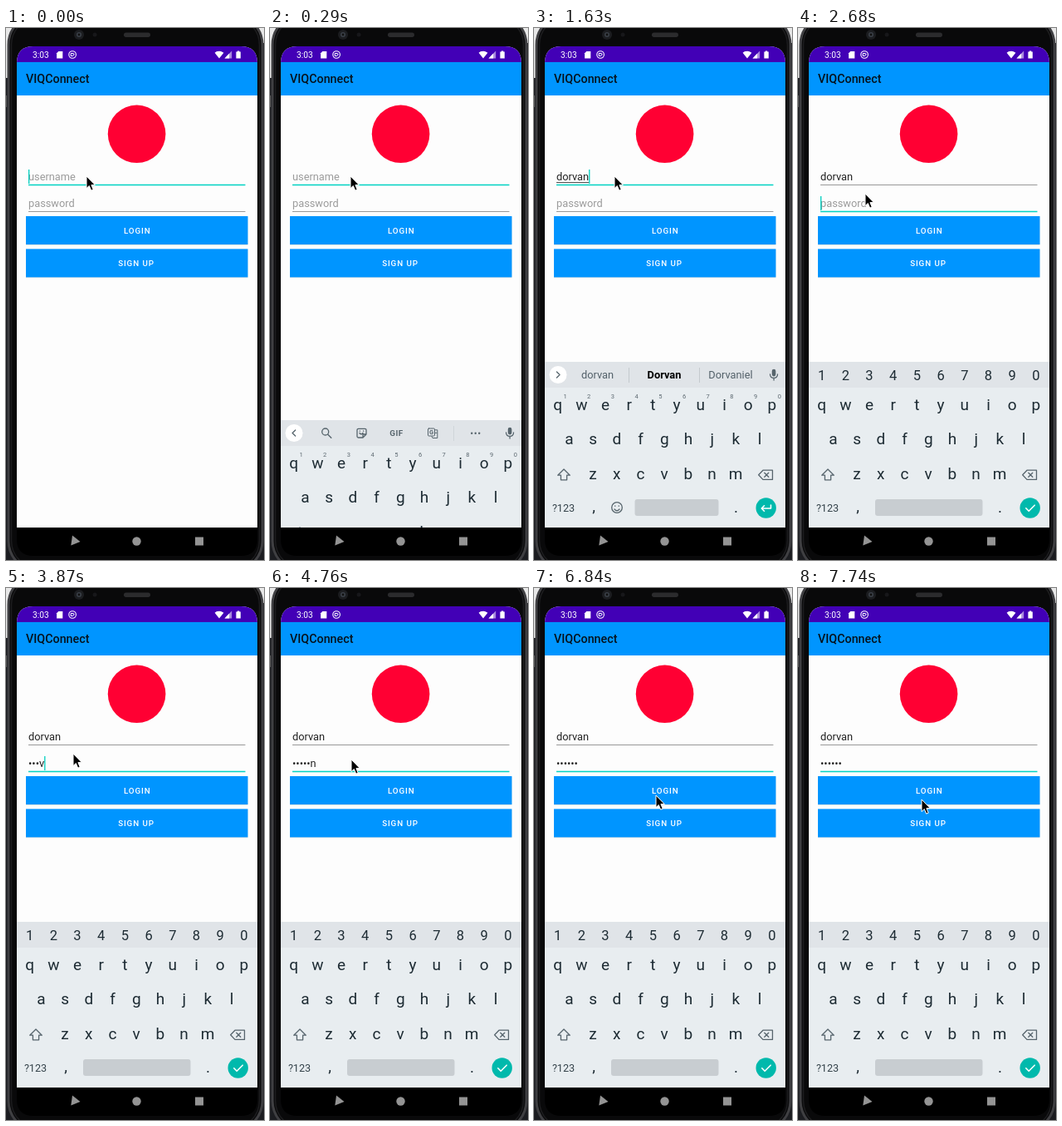
An HTML page that plays this animation: 311 px wide and 639 px high, repeating every 8000 ms.

```html
<!DOCTYPE html>
<html lang="en">
<head>
<meta charset="utf-8">
<title>Login screen</title>
<style>
html, body { margin: 0; width: 100%; height: 100%; overflow: hidden; background: #1c1d21; }
svg { display: block; width: 100vw; height: 100vh; font-family: Roboto, sans-serif; }
.mid { text-anchor: middle; }
.field { font-size: 12.8px; fill: #222; }
.hint { fill: #9b9b9b; }
.btn { font-size: 9.8px; font-weight: 500; letter-spacing: .9px; fill: #fff; }
.key { font-size: 19px; fill: #1d2b33; }
.num { font-size: 16.5px; fill: #1d2b33; }
.sup { font-size: 7.5px; fill: #5c6870; }
.sug { font-size: 12.8px; fill: #53616a; }
.line { fill: none; stroke: #56646c; stroke-width: 1.3; stroke-linejoin: round; stroke-linecap: round; }
.white { stroke: #fff; stroke-width: 1.6; }
.focus { stroke: #03d3c3; stroke-width: 1.3; }
.idle { stroke: #8e8e8e; stroke-width: .9; }

.cursor, .board, .tools, .words, .first, .second, .ripple, .lift {
  animation: 8s step-end infinite;
}
.cursor { animation-name: move; }
.board { animation-name: rise; }
.tools { animation-name: tools; }
.words { animation-name: words; }
.first { animation-name: first; }
.second { animation-name: second; }
.ripple { animation-name: ripple; transform-origin: 149px 254px; }
.lift { animation-name: lift; }

@keyframes move {
  0% { transform: translate(97px, 178px); }
  26% { transform: translate(94px, 183px); }
  27.875% { transform: translate(86px, 193px); }
  29.75% { transform: translate(81px, 199px); }
  57.625% { transform: translate(88px, 202px); }
  59.5% { transform: translate(98px, 206px); }
  61.25% { transform: translate(115px, 217px); }
  63.125% { transform: translate(131px, 229px); }
  65% { transform: translate(141px, 235px); }
  83.625% { transform: translate(143px, 241px); }
  85.5% { transform: translate(147px, 249px); }
  87.375%, 100% { transform: translate(149px, 254px); }
}
@keyframes rise {
  0% { transform: translateY(200px); }
  3.625% { transform: translateY(70px); }
  5.5%, 100% { transform: none; }
}
@keyframes tools { 0% { opacity: 1; } 9.25%, 100% { opacity: 0; } }
@keyframes words { 0% { opacity: 0; } 9.25% { opacity: 1; } 33.5%, 100% { opacity: 0; } }
@keyframes first { 0% { opacity: 1; } 33.5%, 100% { opacity: 0; } }
@keyframes second { 0% { opacity: 0; } 33.5%, 100% { opacity: 1; } }
@keyframes ripple {
  0% { opacity: 0; transform: scale(.4); }
  91.125% { opacity: .24; transform: scale(.4); }
  93% { opacity: .24; transform: scale(1); }
  96.75%, 100% { opacity: 0; transform: scale(1); }
}
@keyframes lift { 0% { opacity: 0; } 91.125% { opacity: .25; } 96.75%, 100% { opacity: 0; } }
</style>
</head>
<body>
<svg viewBox="0 0 311 639" preserveAspectRatio="none">
  <defs>
    <clipPath id="screen"><path d="M13 600V42Q13 22 33 22H283Q303 22 303 42V600Z"/></clipPath>
    <clipPath id="login"><rect x="24" y="226" width="267.5" height="34"/></clipPath>
  </defs>

  <!-- phone body -->
  <path d="M0 0H14V60H0ZM300 0H311V18H300Z" fill="#e8e8e8"/>
  <rect x="3" y="-16" width="306" height="668" rx="36" fill="#09090a" stroke="#3f3f42" stroke-width="3"/>
  <rect x="6.5" y="-12.5" width="299" height="661" rx="32.5" fill="none" stroke="#1d1d1f" stroke-width="1.5"/>
  <path d="M.5 81V95" stroke="#555"/>
  <circle cx="88" cy="8" r="6" fill="#1c1d20"/>
  <circle cx="88" cy="8" r="3" fill="#3a3f47"/>
  <circle cx="88" cy="8" r="1.4" fill="#111"/>
  <circle cx="107" cy="8" r="2.5" fill="#17171a"/>
  <rect x="142" y="5.5" width="32" height="5.5" rx="2.7" fill="#2b2b2d"/>
  <path d="M13 600H303V614Q303 634 283 634H33Q13 634 13 614Z" fill="#000"/>
  <g fill="#949494">
    <path d="M80 609.5L89.5 617L78.3 621.5Z"/>
    <circle cx="157.5" cy="616.5" r="5.2"/>
    <rect x="228" y="611.5" width="10" height="10"/>
  </g>

  <g clip-path="url(#screen)">
    <rect x="13" y="22" width="290" height="578" fill="#fdfdfd"/>
    <rect x="13" y="22" width="290" height="19.5" fill="#4200b6"/>
    <rect x="13" y="41" width="290" height="40" fill="#0095ff"/>

    <!-- status bar -->
    <g fill="#fff">
      <text x="32" y="36" font-size="10.2">3:03</text>
      <path d="M63.3 28H68.3V36.5H61.1V30.3Z"/>
      <path d="M257 36.5L251.6 29.7Q257 25.8 262.4 29.7Z"/>
      <path d="M272.2 27.5V36.5H263.5Z" opacity=".55"/>
      <path d="M269.2 30.6V36.5H263.5Z"/>
      <path d="M277.4 28.6H278.9V27.5H281.3V28.6H282.8V36.5H277.4Z"/>
    </g>
    <circle cx="80.1" cy="32" r="4.3" fill="none" stroke="#fff" stroke-width="1.1"/>
    <path d="M78.2 33.5V30.5H81.4L82.2 32L80.4 33.5Z" fill="none" stroke="#fff"/>

    <text x="24" y="66.2" font-size="14.3" font-weight="500" fill="#06121c">VIQConnect</text>
    <circle cx="157.6" cy="127.3" r="34.8" fill="#ff0033"/>

    <!-- fields -->
    <text id="user" class="field" x="27" y="183"></text>
    <path id="under" stroke="#333" stroke-width=".9"/>
    <text id="pass" class="field" x="27" y="215"></text>
    <g class="first">
      <path class="focus" d="M27 188.5H288.5"/>
      <path class="idle" d="M27 220.5H288.5"/>
    </g>
    <g class="second">
      <path class="idle" d="M27 188.5H288.5"/>
      <path class="focus" d="M27 220.5H288.5"/>
    </g>
    <rect id="caret" width="1.3" height="17" fill="#03cfc0"/>

    <!-- buttons -->
    <rect class="lift" x="24" y="228" width="267.5" height="35" rx="1"/>
    <g opacity=".1">
      <rect x="24" y="227" width="267.5" height="34"/>
      <rect x="24" y="266.2" width="267.5" height="34"/>
    </g>
    <g fill="#0095ff">
      <rect x="24" y="226" width="267.5" height="34"/>
      <rect x="24" y="265.4" width="267.5" height="34"/>
    </g>
    <g clip-path="url(#login)"><circle class="ripple" cx="149" cy="254" r="150" fill="#fff"/></g>
    <text class="btn mid" x="158.3" y="247">LOGIN</text>
    <text class="btn mid" x="157" y="286.3">SIGN UP</text>

    <!-- keyboard -->
    <g class="board">
      <rect x="13" y="401" width="290" height="199" fill="#e8edf0"/>
      <rect x="13" y="401" width="290" height="31" fill="#e0e4e8"/>
      <g id="keys"></g>
      <path class="line" d="M36 530L43.3 537.2H39.6V542.8H32.4V537.2H28.7Z"/>
      <path class="line" d="M276 531.2H287.5V542.4H276L270.7 536.8ZM277.8 534.3L282.8 539.3M282.8 534.3L277.8 539.3"/>
      <text class="mid" x="35.5" y="581" font-size="12.6" fill="#34424a">?123</text>
      <text class="key mid" x="72" y="581">,</text>
      <text class="key mid" x="243.5" y="582">.</text>
      <circle cx="279.7" cy="576.5" r="12.2" fill="#00b9ac"/>

      <g class="first">
        <g id="sups"></g>
        <circle class="line" cx="100" cy="576" r="6.3"/>
        <path class="line" d="M97 578Q100 581.5 103 578M97.8 574V574.3M102.2 574V574.3"/>
        <rect x="121.5" y="566" width="101" height="20" rx="3" fill="#c8cdd1"/>
        <path class="line white" d="M285.5 573V577H274.5M277.5 573.8L274.3 577L277.5 580.2"/>
        <circle cx="29" cy="416.5" r="10.5" fill="#fff"/>
        <rect x="286.8" y="409.8" width="4.6" height="8.6" rx="2.3" fill="#56646c"/>
        <path class="line" d="M284.6 416Q284.8 420.4 289.1 420.4T293.6 416M289.1 420.5V423"/>
        <g class="tools">
          <path class="line" d="M30.6 413L27 416.5L30.6 420"/>
          <circle class="line" cx="66.7" cy="415" r="4"/>
          <path class="line" d="M69.8 418.2L73.8 422.2"/>
          <path class="line" d="M106.5 411.3H114.5Q116 411.3 116 412.8V418L112 422H106.5Q105 422 105 420.5V412.8Q105 411.3 106.5 411.3ZM112 422V418H116M108 416.5Q110 419.3 112 416.5M108.3 414V414.2M112.6 414V414.2"/>
          <text class="mid" x="152.5" y="420" font-size="9.8" font-weight="700" letter-spacing=".5" fill="#56646c">GIF</text>
          <g stroke-width="1">
            <rect class="line" x="190.5" y="411" width="8" height="9" rx="1" style="stroke-width:1"/>
            <path class="line" d="M199.5 412.8H201.8V422.5H196L195 420.6M198.6 416.3H201" style="stroke-width:1"/>
          </g>
          <text class="mid" x="194.5" y="418.2" font-size="7.5" font-weight="700" fill="#56646c">G</text>
          <path d="M221.5 408V426" stroke="#d0d5d9"/>
          <g fill="#56646c">
            <circle cx="243.2" cy="416.8" r="1.2"/><circle cx="247.7" cy="416.8" r="1.2"/><circle cx="252.2" cy="416.8" r="1.2"/>
          </g>
        </g>
        <g class="words">
          <path class="line" d="M27.4 413L31 416.5L27.4 420"/>
          <path d="M114.5 408V426M199.5 408V426" stroke="#c4cace" stroke-width="1"/>
          <text id="left" class="sug mid" x="76.5" y="421.3"></text>
          <text id="best" class="sug mid" x="157" y="421.3" style="font-weight:700;fill:#000"></text>
          <text id="right" class="sug mid" x="237" y="421.3"></text>
        </g>
      </g>

      <g class="second">
        <g id="nums"></g>
        <rect x="93" y="566" width="129.5" height="20" rx="3" fill="#c8cdd1"/>
        <path class="line white" d="M274.8 576.8L278.2 580.2L285.2 573.2"/>
      </g>
    </g>
  </g>

  <path class="cursor" d="M0 0V14.6L3.3 11.5L5.7 17.2L8.2 16.1L5.9 10.6H10.3Z" fill="#000" stroke="#fff" stroke-width="1"/>
</svg>
<script>
const $ = id => document.getElementById(id);
const NS = "http://www.w3.org/2000/svg";

function row(parent, chars, x, y, cls) {
  [...chars].forEach((c, i) => {
    const el = document.createElementNS(NS, "text");
    el.setAttribute("class", cls + " mid");
    el.setAttribute("x", x + i * 28.7);
    el.setAttribute("y", y);
    el.textContent = c;
    $(parent).append(el);
  });
}
row("keys", "qwertyuiop", 28.6, 458.6, "key");
row("keys", "asdfghjkl", 42.5, 499.8, "key");
row("keys", "zxcvbnm", 71, 541.7, "key");
row("sups", "1234567890", 37.5, 444.5, "sup");
row("nums", "1234567890", 28.6, 423.3, "num");

const LOOP = 8000, FOCUS = 2680, MASK = 5650;
const name = "dorvan";
const userKeys = [740, 890, 1030, 1330, 1480, 1630];
const passKeys = [3280, 3420, 3570, 3870, 4020, 4160];
// moments at which the caret turns off or on
const blinks = [290, 740, 2080, FOCUS, 3130, 3280, 4610, 5200, MASK, 6240, 6690, 7290, 7740];
const guesses = [
  ["Do", "Did"], ["Do", "Don't"], ["For", "Door"],
  ["Dorv", "Dorvan"], ["Dorva", "Dorvan"], ["Dorvan", "Dorvaniel"]
];
const passed = (times, t) => times.filter(k => k <= t).length;

function setField(el, text, hint) {
  el.textContent = text || hint;
  el.classList.toggle("hint", !text);
  return text ? el.getComputedTextLength() : 0;
}

function draw(t) {
  const n = passed(userKeys, t), p = passed(passKeys, t);
  const typed = name.slice(0, n);
  const shown = t < MASK && p ? 1 : 0;
  const secret = "•".repeat(p - shown) + (shown ? name[p - 1] : "");
  const userEnd = setField($("user"), typed, "username");
  const passEnd = setField($("pass"), secret, "password");
  const second = t >= FOCUS;

  $("under").setAttribute("d", n && !second ? `M27 185.6h${userEnd}` : "");
  $("caret").setAttribute("x", 27 + (second ? passEnd : userEnd));
  $("caret").setAttribute("y", second ? 202 : 170);
  $("caret").setAttribute("opacity", passed(blinks, t) % 2 ? 0 : 1);

  const [best, right] = n ? guesses[n - 1] : ["", ""];
  $("left").textContent = typed;
  $("best").textContent = best;
  $("right").textContent = right;
}

let start;
function tick(now) {
  start ??= now;
  draw((now - start) % LOOP);
  requestAnimationFrame(tick);
}
draw(0);
requestAnimationFrame(tick);
</script>
</body>
</html>
```
